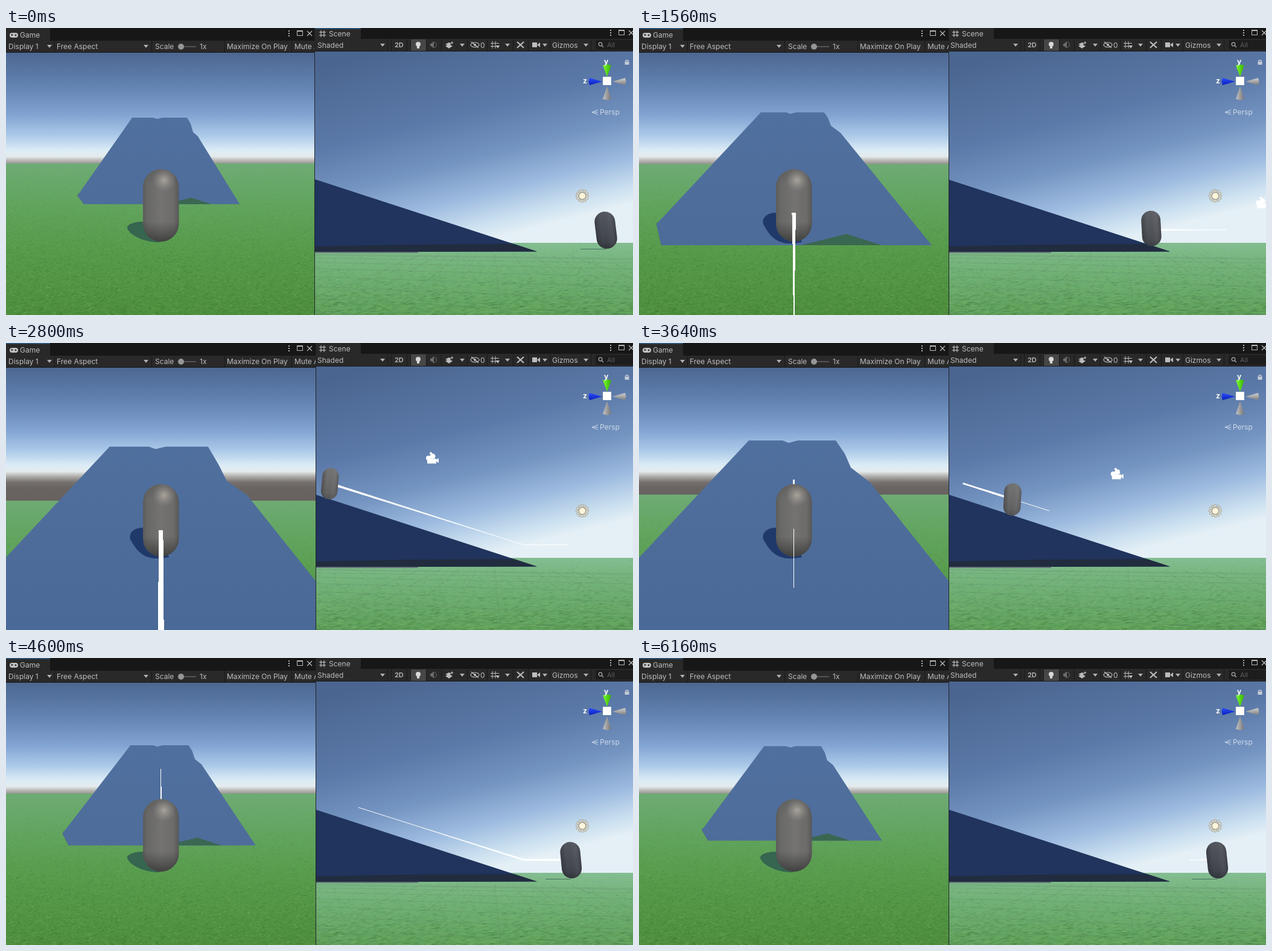
Animation, 1039 px wide and 477 px high, one loop 6240 ms. Source, as an HTML page with a canvas:

```html
<!DOCTYPE html>
<html lang="en">
<head>
<meta charset="utf-8">
<title>Ramp test</title>
<style>
html, body { margin: 0; width: 100%; height: 100%; overflow: hidden; background: #191919; }
canvas { display: block; }
</style>
</head>
<body>
<canvas id="stage" width="1039" height="477"></canvas>
<script>
const LOOP = 6240, STEP = 40, TRAIL = 1665, CORNER = 858;
const main = document.getElementById('stage').getContext('2d');
let c = main;

const clamp = v => Math.max(0, Math.min(1, v));
const lerp = (a, b, m) => a + (b - a) * m;
let seed = 7;
const rnd = () => (seed = seed * 16807 % 2147483647) / 2147483647;

// ---- drawing helpers
function rect(x, y, w, h, fill) { c.fillStyle = fill; c.fillRect(x, y, w, h); }
function trace(p) {
  c.beginPath();
  for (let i = 0; i < p.length; i += 2) c.lineTo(p[i], p[i + 1]);
}
function poly(p, fill) { trace(p); c.closePath(); c.fillStyle = fill; c.fill(); }
function line(p, stroke, width = 1) { trace(p); c.strokeStyle = stroke; c.lineWidth = width; c.stroke(); }
function disc(x, y, r, fill) { c.beginPath(); c.arc(x, y, r, 0, 7); c.fillStyle = fill; c.fill(); }
function ring(x, y, r, stroke, width = 1) {
  c.beginPath(); c.arc(x, y, r, 0, 7); c.strokeStyle = stroke; c.lineWidth = width; c.stroke();
}
function pill(x, y, w, h, r, fill) { c.beginPath(); c.roundRect(x, y, w, h, r); c.fillStyle = fill; c.fill(); }
function text(s, x, y, fill = '#bdbdbd', font = '12px') {
  c.font = font + ' Inter, sans-serif'; c.fillStyle = fill; c.fillText(s, x, y);
}
function gradient(x0, y0, x1, y1, stops) {
  const g = c.createLinearGradient(x0, y0, x1, y1);
  for (const [at, color] of stops) g.addColorStop(at, color);
  return g;
}
function clipped(x, y, w, h, draw) {
  c.save(); c.beginPath(); c.rect(x, y, w, h); c.clip(); draw(); c.restore();
}
const dropArrow = (x, y) => poly([x - 4, y - 2, x + 4, y - 2, x, y + 3], '#b0b0b0');

function grass(w, h, stops, count, stretch) {
  const sheet = document.createElement('canvas');
  sheet.width = w; sheet.height = h;
  c = sheet.getContext('2d');
  rect(0, 0, w, h, gradient(0, 0, 0, h, stops));
  for (let i = 0; i < count; i++) {
    const y = h * Math.pow(rnd(), .75), near = y / h, x = rnd() * w, len = (1 + 3 * near) * stretch;
    line([x, y, x + len, y - near * 2 * rnd()], `rgba(${rnd() < .5 ? '30,80,25' : '150,205,120'},${.05 + .13 * near})`);
  }
  c = main;
  return sheet;
}
const gameGrass = grass(514, 254, [[0, '#6fab75'], [.2, '#64a663'], [.55, '#579b4b'], [1, '#4d8d3c']], 9000, 1);
const sceneGrass = grass(528, 122, [[0, '#84bd92'], [.25, '#76b57e'], [1, '#5e9f5a']], 4000, 2.2);

// ---- motion: each speed change is smoothed over 200 ms
const run = u => Math.abs(u) < 100 ? (u + 100) ** 2 / 400 : Math.max(0, u);
const posX = t => 993 - .335 * (run(t - 1130) - run(t - 2492)) + .332 * (run(t - 3393) - run(t - 4662));
const posY = x => 335.5 - .318 * Math.max(0, CORNER - x);

// ---- far outline of the ramp in the game view, by player position
const outline = [
  [993, [209,149, 243,149, 251,151, 259,149, 300,149, 306,159, 310,173, 318,180]],
  [858, [202.5,139.5, 244,139.5, 251,142, 260,139.5, 306,139.5, 312,148, 317,161, 332,172]],
  [675, [189,155, 239,155, 248,159, 262,155, 320,155, 333,171, 341,192, 372,218]],
  [619, [182,162, 238,162, 248,166, 263,162, 326,162, 341,184, 351,207, 383,232]]
];
function farEdge(x) {
  const i = x > 858 ? 0 : x > 675 ? 1 : 2, [xa, a] = outline[i], [xb, b] = outline[i + 1];
  return a.map((v, j) => lerp(v, b[j], (x - xa) / (xb - xa)));
}
function gameRamp(x) {
  const k = 1 / (1.142e-5 * (Math.max(x, 700) - 653.6)), m = clamp((x - 849) / 144);
  const nearY = 200.6 + .358 * k, leftY = 200.6 + lerp(.28, .304, m) * k;
  const onRamp = x < 849;
  const left = onRamp ? (357 - leftY) / 1.07 : 256.5 - lerp(.509, .537, m) * k;
  const right = onRamp ? 513 + (nearY - 396) / 1.25 : 256.5 + .508 * k;
  const corner = left + lerp(.018, .043, m) * k;
  poly([left, leftY, left + 2, leftY - 4, corner + 8, nearY - 4, corner, nearY], '#3b5a5c');
  poly([...farEdge(x), right, nearY, corner, nearY, left, leftY], gradient(0, 140, 0, 477, [[0, '#50709f'], [1, '#4b6996']]));
  const at = f => 256.5 + f * k;
  poly([at(.026), nearY, at(.195), 200.6 + .316 * k, at(.325), nearY], '#3a6752');
}

// ---- trail points: position and taper (1 at the player, 0 at the oldest end)
function trailPoints(t) {
  const pts = [];
  let length = 0;
  for (let age = 0; age <= TRAIL; age += 15) {
    const x = posX(t - age);
    if (pts.length) length += Math.abs(x - pts[pts.length - 1].x);
    pts.push({ x, y: posY(x), length });
  }
  for (const p of pts) p.taper = length > .5 ? (1 - p.length / length) ** 1.4 : 0;
  return pts;
}
function gameTrail(pts, inFront) {
  const head = pts[0];
  const project = p => {
    const depth = 180 - (p.x - head.x);
    return depth < 25 ? null : { y: 200.6 + (16992 - 385 * (head.y - p.y)) / depth, w: 7 * p.taper * 180 / depth };
  };
  for (let i = 1; i < pts.length; i++) {
    const a = project(pts[i - 1]), b = project(pts[i]);
    if (!a || !b || b.w < .5 || (pts[i].x - head.x > 14) !== inFront) continue;
    const w = Math.max(1, Math.round(b.w));
    rect(Math.round(256.5 - w / 2), Math.min(a.y, b.y), w, Math.abs(a.y - b.y) + .5, '#fff');
  }
}
function sceneTrail(pts) {
  for (let i = 1; i < pts.length; i++) {
    const a = pts[i - 1], b = pts[i], w = 4 * b.taper;
    if (w > .2) line([a.x, a.y, b.x, b.y], '#fff', Math.max(1, w));
  }
}

function gameCapsule() {
  pill(227, 234.5, 59.5, 120.5, 30, gradient(227, 0, 287, 0,
    [[0, '#5c5c5b'], [.12, '#686867'], [.5, '#747372'], [.85, '#6c6b6a'], [1, '#565655']]));
  c.fillStyle = gradient(0, 235, 0, 355,
    [[0, 'rgba(40,40,40,.18)'], [.2, 'rgba(40,40,40,0)'], [.72, 'rgba(40,40,40,0)'], [1, 'rgba(30,32,30,.6)']]);
  c.fill();
  const shine = c.createRadialGradient(262, 253, 1, 262, 253, 19);
  shine.addColorStop(0, 'rgba(178,172,162,.8)');
  shine.addColorStop(1, 'rgba(150,146,140,0)');
  c.fillStyle = shine;
  c.fill();
}
function gameShadow(onRamp) {
  c.beginPath();
  if (onRamp) {
    c.moveTo(229, 307);
    c.bezierCurveTo(209, 306, 202, 319, 207, 328);
    c.bezierCurveTo(218, 348, 230, 360, 257, 358);
    c.lineTo(270, 356);
  } else {
    c.moveTo(230, 322);
    c.bezierCurveTo(212, 321, 199, 327, 201, 333);
    c.bezierCurveTo(206, 345, 230, 357, 256, 356);
  }
  c.lineTo(256, 320);
  c.fillStyle = onRamp ? '#20396b' : '#366550';
  c.fill();
}

function drawGame(x, pts, split) {
  const horizon = 225 + .36 * (335.5 - posY(x));
  clipped(0, 41, split, 436, () => {
    rect(0, 41, split, 250, gradient(0, 41, 0, 291, [[0, '#4c6791'], [.22, '#6282b1'], [.42, '#83a5d3'], [.55, '#abc9e8'],
      [.65, '#dcecf6'], [.69, '#e4ebec'], [.72, '#b4b2b0'], [.76, '#777270'], [.8, '#696461'], [1, '#655f5c']]));
    c.drawImage(gameGrass, 0, horizon);
    gameRamp(x);
    gameShadow(x < 862);
    gameTrail(pts, false);
    gameCapsule();
    gameTrail(pts, true);
  });
}

function sun(x, y) {
  for (let i = 0; i < 12; i++) {
    const a = i * Math.PI / 6, dx = Math.cos(a), dy = Math.sin(a);
    line([x + dx * 7, y + dy * 7, x + dx * 11, y + dy * 11], '#8d8570', 3);
    line([x + dx * 7, y + dy * 7, x + dx * 10.5, y + dy * 10.5], '#f6ecd2', 1.6);
  }
  disc(x, y, 6.3, '#8d8570');
  disc(x, y, 5.3, '#fff4da');
}
function cameraIcon(x, y) {
  disc(x - 2, y - 9, 2, '#fff');
  disc(x - 6, y - 1, 4, '#fff');
  disc(x + 1, y - 4, 4.5, '#fff');
  rect(x - 8, y, 15, 8, '#fff');
  poly([x + 5, y + 3, x + 11, y - 1, x + 11, y + 7], '#fff');
}
function sceneCapsule(x, y) {
  const m = clamp((x - 700) / 220), w = 28.5 + .0145 * (x - 619), h = 54 + .021 * (x - 619);
  const tone = d => `rgb(${lerp(104, 69, m) + d},${lerp(104, 73, m) + d},${lerp(105, 81, m) + d})`;
  c.save();
  c.translate(x, y + .5);
  c.rotate((730 - x) / 37.5 * Math.PI / 180);
  pill(-w / 2, -h / 2, w, h, w / 2, gradient(0, -h / 2, 0, h / 2,
    [[0, tone(14)], [.25, tone(8)], [.6, tone(0)], [.8, tone(-6)], [1, tone(-22)]]));
  c.fillStyle = gradient(-w / 2, 0, w / 2, 0,
    [[0, 'rgba(30,30,32,.35)'], [.3, 'rgba(30,30,32,0)'], [.75, 'rgba(140,140,140,.12)'], [1, 'rgba(30,30,32,.25)']]);
  c.fill();
  c.restore();
}
function axisGizmo() {
  const cone = (p, a, b, ...dir) => poly(p, gradient(...dir, [[0, a], [1, b]]));
  cone([989, 62, 996, 60.5, 1003, 62, 996, 81], '#7dff35', '#36b000', 989, 0, 1003, 0);
  cone([967, 83, 965.5, 89, 967, 95, 988, 89], '#2b4dff', '#0a1fb8', 0, 83, 0, 95);
  cone([1026, 83, 1027.5, 89, 1026, 95, 1005, 89], '#d2d2d2', '#7c7c7c', 0, 83, 0, 95);
  cone([989, 118, 996, 120, 1003, 118, 996, 97], '#c4c4c4', '#757575', 989, 0, 1003, 0);
  rect(989, 81, 14, 14, '#e9eef2');
  rect(990, 82, 12, 12, '#fff');
  text('y', 991, 60, '#fff', 'bold 12px');
  text('z', 956, 92, '#fff', 'bold 12px');
  c.beginPath(); c.arc(1029, 56, 2.5, Math.PI, 0);
  c.strokeStyle = '#c3cbd6'; c.lineWidth = 1.3; c.stroke();
  rect(1025.5, 56, 7, 5, '#c3cbd6');
  for (const y of [136, 140, 144]) line([981, y, 971, 140], '#cbd8ea');
  text('Persp', 984, 144, '#cbd8ea');
}

function drawScene(x, pts, split) {
  const y = posY(x);
  clipped(split, 39, 1039 - split, 438, () => {
    rect(split, 39, 528, 320, gradient(690, 20, 775, 358, [[0, '#4a658f'], [.38, '#5b79a8'], [.6, '#7393c0'],
      [.78, '#9cbadf'], [.92, '#cbe0f0'], [1, '#e5f0f6']]));
    c.drawImage(sceneGrass, 511, 357);
    for (let i = 0; i < 9; i++) {
      line([511, 376 + i * i * 1.5, 1039, 383 + i * i * 1.9], 'rgba(90,110,95,.22)');
      line([690 + i * 30, 376, 440 + i * 95, 477], 'rgba(90,110,95,.2)');
    }
    rect(511, 371, 172, 3, '#65777b');
    poly([511, 251.2, 880, 371.5, 511, 372], '#20345d');
    poly([511, 363, 660, 360, 842, 359, 880, 371.5, 683, 372, 511, 372], '#212c3f');
    if (x > 866) line([x - 42, 367.5, x, 367.5], '#46705a');
    sun(955, 279);
    sceneTrail(pts);
    sceneCapsule(x, y);
    cameraIcon(x + 173 + .045 * (x - 619), y - 41);
    axisGizmo();
  });
}

// ---- editor chrome
function windowButtons(x, y) {
  for (const d of [-4, 0, 4]) rect(x - 1, y + d - 1, 2, 2, '#b8b8b8');
  c.strokeStyle = '#b8b8b8'; c.lineWidth = 1;
  c.strokeRect(x + 13.5, y - 4.5, 9, 8);
  rect(x + 13, y - 5, 10, 2, '#b8b8b8');
  line([x + 30, y - 4, x + 38, y + 4], '#b8b8b8', 1.3);
  line([x + 38, y - 4, x + 30, y + 4], '#b8b8b8', 1.3);
}
function gameChrome(split, focused) {
  clipped(0, 0, split - 1, 41, () => {
    rect(0, 0, split, 41, '#171717');
    rect(0, 0, 73, 21, '#292929');
    rect(0, 21, split, 19, '#292929');
    if (focused) rect(0, 0, 73, 1.5, '#2c5d87');
    for (const x of [80, 241, 362, 473]) rect(x, 21, 1, 19, '#191919');
    pill(6, 8, 14, 8, 4, '#c4c4c4');
    rect(8, 11, 4, 1, '#292929');
    rect(9.5, 9.5, 1, 4, '#292929');
    disc(16, 12, 1.4, '#292929');
    text('Game', 23, 16);
    text('Display 1', 4, 35);
    dropArrow(72, 30);
    text('Free Aspect', 84, 35);
    dropArrow(232, 30);
    text('Scale', 247, 35);
    rect(290, 30, 25, 2, '#555');
    disc(290, 31, 5, '#969696');
    text('1x', 321, 35);
    text('Maximize On Play', 366, 35);
    text('Mute Audio', 478, 35);
    windowButtons(469, 9);
  });
}
function sceneChrome(split, focused) {
  const ink = '#bdbdbd';
  clipped(split, 0, 1039 - split, 39, () => {
    rect(split, 0, 528, 39, '#171717');
    rect(split, 0, 588 - split, 19, '#292929');
    rect(split, 18, 528, 20, '#292929');
    if (focused) rect(split, 0, 588 - split, 1.5, '#2c5d87');
    for (const x of [632, 638, 664, 670, 696, 721, 764, 797, 840, 865, 901, 969]) rect(x, 19, 1, 19, '#191919');
    rect(671, 19, 25, 19, '#474747');
    for (const d of [522, 527]) {
      line([d, 4, d, 15], ink, 1.2);
      line([519, d - 515, 530, d - 515], ink, 1.2);
    }
    text('Scene', 535, 14);
    text('Shaded', 516, 33);
    dropArrow(624, 28);
    text('2D', 644, 32, ink, '600 11px');
    disc(683, 27, 4, '#d8d8d8');
    rect(681, 30, 4, 4, '#d8d8d8');
    poly([703, 26, 706, 26, 709, 23, 709, 33, 706, 30, 703, 30], '#6e6e6e');
    ring(709, 28, 4.5, '#6e6e6e');
    poly([728, 30, 734, 27, 740, 30, 734, 34], ink);
    poly([728, 27, 734, 24, 738, 26, 734, 29], ink);
    text('+', 736, 27, ink, 'bold 9px');
    c.beginPath(); c.ellipse(777, 28, 7, 4, 0, 0, 7);
    c.strokeStyle = ink; c.lineWidth = 1.2; c.stroke();
    disc(777, 28, 2, ink);
    line([771, 23, 783, 33], ink, 1.3);
    text('0', 786, 33);
    for (const d of [0, 5]) {
      line([806 + d, 22, 806 + d, 34], ink);
      line([803, 25.5 + d, 817, 25.5 + d], ink);
    }
    poly([812, 29, 818, 29, 815, 34], ink);
    line([847, 23, 858, 33], ink, 2.2);
    line([847, 33, 858, 23], ink, 2.2);
    rect(872, 24, 8, 8, ink);
    poly([880, 28, 885, 24, 885, 32], ink);
    text('Gizmos', 905, 33);
    for (const x of [756, 831, 893, 961]) dropArrow(x, 28);
    pill(977, 20, 80, 16, 3, '#1d1d1d');
    ring(985, 27, 2.8, '#aaa', 1.2);
    line([987, 29, 990, 32], '#aaa', 1.2);
    text('All', 996, 32, '#5e5e5e', '11px');
    windowButtons(1002, 8);
  });
  rect(split - 1, 0, 1, 477, '#20242a');
}

function draw(t) {
  const sceneFocused = t < 440;
  const x = posX(t) + (sceneFocused ? 1 : 0), split = sceneFocused ? 512 : 514;
  const pts = trailPoints(t);
  drawGame(x, pts, split);
  drawScene(x, pts, split);
  gameChrome(split, !sceneFocused);
  sceneChrome(split, sceneFocused);
}
function tick() {
  draw(Math.floor(performance.now() % LOOP / STEP) * STEP);
  requestAnimationFrame(tick);
}
tick();
</script>
</body>
</html>
```
